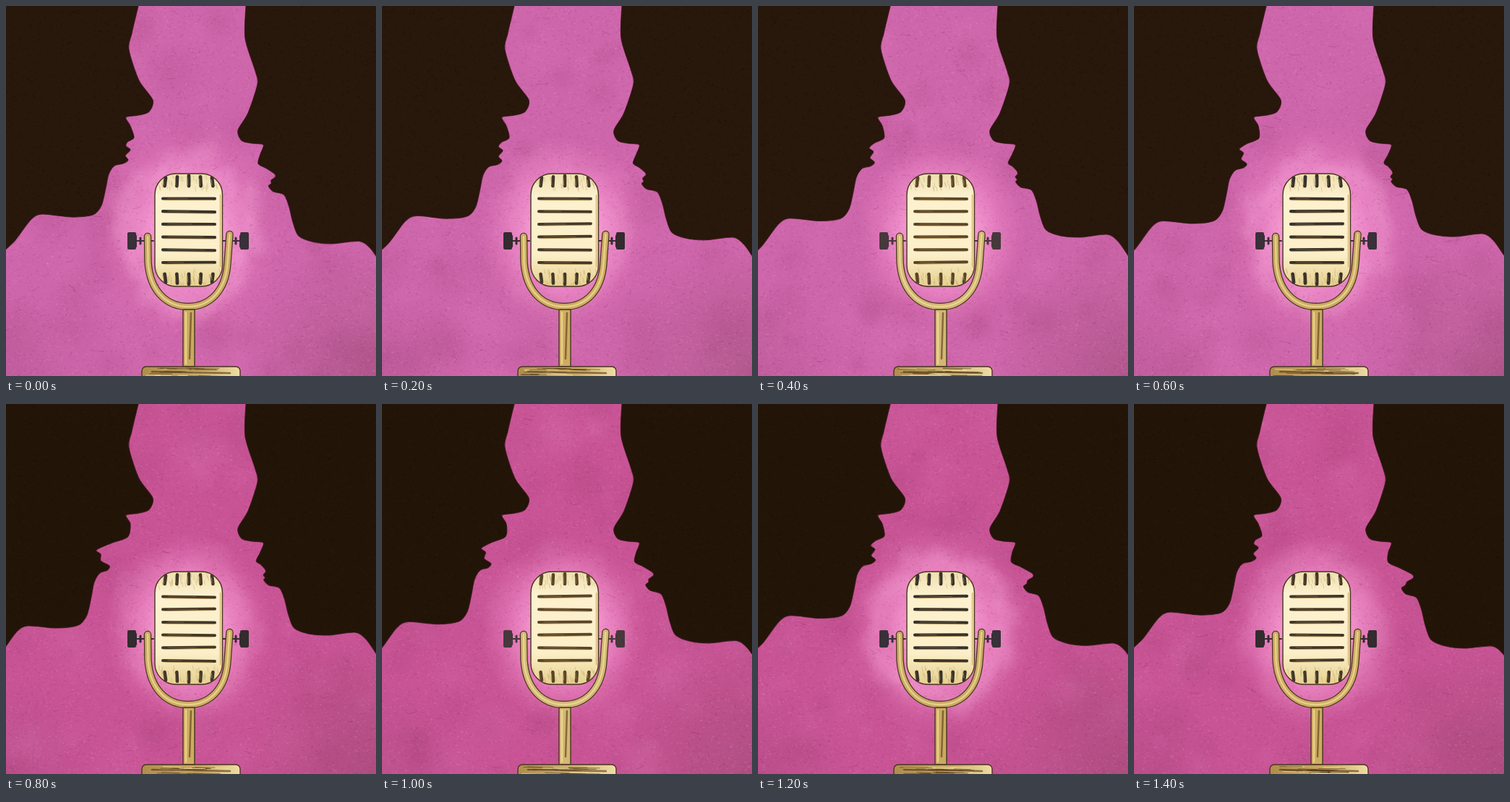
These frames come from a looping animation (512 px wide and 512 px high, 1600 ms). An HTML page with a canvas:

```html
<!DOCTYPE html>
<html lang="en">
<head>
<meta charset="utf-8">
<title>Two voices, one microphone</title>
<style>
html, body { margin: 0; width: 100%; height: 100%; overflow: hidden; background: #c966a8; }
canvas { display: block; width: 100vw; height: 100vh; }
</style>
</head>
<body>
<canvas id="stage" width="512" height="512"></canvas>
<script>
const SIZE = 512, STEP = 200, STEPS = 8;
const TAU = Math.PI * 2;

// A face at rest: still brow and nose, then lips, chin, neck and shoulder.
// Opening the mouth carries the jaw by "body" and the lips by "lip" more.
const left = {
  edge: 0, body: -20, lip: -22,
  open: [0, .12, .3, .5, 1, .7, .25, 0],
  brow: [183,0, 174,38, 170,60, 184,103, 203,130, 198,146, 184,151],
  jaw: [166,154, 172,166, 177,182, 168,188, 166,194, 172,199, 165,207, 169,213, 162,218, 150,221,
    142,233, 138,252, 132,276, 120,289, 90,292, 50,288, 34,296, 12,325, -10,345]
};
const right = {
  edge: SIZE, body: 13, lip: 16,
  open: [.52, .25, .05, 0, .05, .62, .8, 1],
  brow: [332,0, 331,45, 345,90, 348,108, 335,148, 321,172, 326,186, 340,190],
  jaw: [356,192, 352,205, 346,217, 352,222, 357,228, 358,232, 355,236, 358,240, 356,243, 363,250,
    378,254, 385,270, 390,290, 398,309, 418,317, 445,319, 482,315, 498,325, 514,348]
};

// Three hand-inked versions of the microphone and glow take turns
const looks = [
  { ink: '#39322b', bar: 4.2, knob: '#393039', gold: '#c9aa62', reach: 132, patchy: 1 },
  { ink: '#5a4528', bar: 4, knob: '#47383b', gold: '#d2b775', reach: 116, patchy: .2 },
  { ink: '#433728', bar: 4, knob: '#332b2e', gold: '#cdac62', reach: 118, patchy: .4 }
];

function random(seed) {
  let s = seed * 7919 + 17;
  return () => (s = (s * 16807) % 2147483647) / 2147483647;
}

const rgba = (c, a) => `rgba(${c.join()},${a})`;

function outline(side, step) {
  const k = side.open[step];
  const jaw = side.jaw.map((v, n) => {
    const i = n >> 1;
    const ramp = k * Math.max(0, Math.min(1, (i - 1) / 3));
    const pout = Math.exp(-(((i - 4.5) / 2.2) ** 2));
    return v + ramp * (n % 2 ? Math.min(22, 4 + i) : side.body + side.lip * pout);
  });
  return side.brow.concat(jaw);
}

function blob(g, x, y, r, color, a) {
  const f = g.createRadialGradient(x, y, 0, x, y, r);
  f.addColorStop(0, rgba(color, a));
  f.addColorStop(1, rgba(color, 0));
  g.fillStyle = f;
  g.fillRect(x - r, y - r, 2 * r, 2 * r);
}

function paper(g, pink, look, rnd) {
  g.fillStyle = rgba(pink, 1);
  g.fillRect(0, 0, SIZE, SIZE);
  for (let i = 0; i < 90; i++) {
    const tone = i % 2 ? [150, 55, 105] : [226, 128, 190];
    blob(g, rnd() * SIZE, rnd() * SIZE, 15 + rnd() * 35, tone, .13);
  }
  blob(g, SIZE, SIZE, 190, [135, 65, 95], .4);
  blob(g, 0, SIZE, 130, [135, 55, 100], .2);

  g.save();
  g.translate(253, 313);
  g.scale(1, 1.13);
  const f = g.createRadialGradient(0, 0, 45, 0, 0, look.reach);
  f.addColorStop(0, 'rgba(255,168,222,.8)');
  f.addColorStop(.4, 'rgba(248,146,208,.55)');
  f.addColorStop(.75, 'rgba(236,125,190,.2)');
  f.addColorStop(1, 'rgba(230,120,185,0)');
  g.fillStyle = f;
  g.fillRect(-160, -160, 320, 320);
  for (let i = 0; i < 34; i++) {
    const a = i / 34 * TAU, r = 75 + rnd() * 26;
    blob(g, Math.cos(a) * r, Math.sin(a) * r, 13 + rnd() * 12, [246, 168, 218], .26 * look.patchy);
  }
  g.restore();
}

function grain(g, rnd) {
  for (let i = 0; i < 12000; i++) {
    g.fillStyle = rnd() < .5 ? 'rgba(110,30,75,.1)' : 'rgba(255,190,230,.1)';
    g.fillRect(rnd() * SIZE, rnd() * SIZE, 1 + rnd() * 2, 1 + rnd());
  }
  g.lineWidth = .7;
  g.strokeStyle = 'rgba(105,25,70,.28)';
  for (let i = 0; i < 55; i++) {
    const x = rnd() * SIZE, y = rnd() * SIZE, a = rnd() * TAU, r = 2 + rnd() * 6;
    g.beginPath();
    g.moveTo(x, y);
    g.quadraticCurveTo(x + r, y + rnd() * 4, x + Math.cos(a) * r * 2, y + Math.sin(a) * r);
    g.stroke();
  }
}

function curve(g, p) {
  const n = p.length / 2, k = .14;
  const at = i => { i = Math.max(0, Math.min(n - 1, i)); return [p[2 * i], p[2 * i + 1]]; };
  g.moveTo(p[0], p[1]);
  for (let i = 0; i < n - 1; i++) {
    const [a, b, c, d] = [at(i - 1), at(i), at(i + 1), at(i + 2)];
    g.bezierCurveTo(b[0] + (c[0] - a[0]) * k, b[1] + (c[1] - a[1]) * k,
      c[0] - (d[0] - b[0]) * k, c[1] - (d[1] - b[1]) * k, c[0], c[1]);
  }
}

function face(g, side, step, dark, rnd) {
  const points = outline(side, step);
  g.save();
  g.beginPath();
  curve(g, points);
  g.lineTo(side.edge, SIZE * .6);
  g.lineTo(side.edge, 0);
  g.closePath();
  g.fillStyle = dark;
  g.fill();
  g.clip();
  for (let i = 0; i < 2200; i++) {
    g.fillStyle = i % 2 ? 'rgba(70,43,22,.16)' : 'rgba(5,2,0,.16)';
    g.fillRect(Math.abs(side.edge - rnd() * 212), rnd() * 362, 2, 1.5);
  }
  g.restore();
  g.beginPath();
  curve(g, points);
  g.strokeStyle = 'rgba(58,20,25,.8)';
  g.lineWidth = 1.2;
  g.stroke();
}

function box(g, x, y, w, h, r, fill, line) {
  g.beginPath();
  g.roundRect(x, y, w, h, r);
  g.fillStyle = fill;
  g.fill();
  if (line) {
    g.strokeStyle = line;
    g.lineWidth = 1.4;
    g.stroke();
  }
}

function dash(g, x1, y1, x2, y2, w, color) {
  g.beginPath();
  g.moveTo(x1, y1);
  g.lineTo(x2, y2);
  g.lineWidth = w;
  g.strokeStyle = color;
  g.stroke();
}

function yoke(g, w, color) {
  g.beginPath();
  g.moveTo(196, 319);
  g.lineTo(196.5, 354);
  g.bezierCurveTo(199, 394, 222, 416, 252, 416);
  g.bezierCurveTo(282, 416, 304, 394, 306.5, 356);
  g.lineTo(309.5, 316);
  g.lineWidth = w;
  g.strokeStyle = color;
  g.stroke();
}

function screw(g, x, out, color) {
  dash(g, x, 325, x + out * 24, 325, 1.8, color);
  dash(g, x + out * 18, 321, x + out * 18, 329, 3, color);
  box(g, x + out * 30 - 6, 313, 12, 24, 2, color);
  dash(g, x + out * 24, 318, x + out * 24, 333, 2, color);
}

function stand(g, look, edge, rnd) {
  const { gold } = look;
  yoke(g, 10.5, edge);
  yoke(g, 8, gold);
  yoke(g, 2.5, 'rgba(248,228,160,.65)');
  box(g, 245, 420, 16, 79, 1, gold, edge);
  dash(g, 249, 424, 249, 495, 2.5, 'rgba(246,224,155,.7)');
  dash(g, 256, 425, 254, 488, 2.5, 'rgba(95,65,25,.65)');
  const f = g.createLinearGradient(187, 0, 324, 0);
  f.addColorStop(0, '#ae8d4c');
  f.addColorStop(.6, gold);
  f.addColorStop(1, '#efdda6');
  box(g, 188, 499, 136, 22, 6, f, edge);
  for (let i = 0; i < 20; i++) {
    const x = 192 + rnd() * 80, y = 501 + rnd() * 11;
    dash(g, x, y, x + 20 + rnd() * 28, y + rnd(), 1, i % 3 ? 'rgba(75,50,20,.6)' : 'rgba(250,228,165,.7)');
  }
  dash(g, 202, 506, 310, 508, 2.5, 'rgba(75,48,20,.6)');
}

function head(g, look, edge, rnd) {
  const { ink, bar } = look, shade = 'rgba(190,150,75,.7)';
  const f = g.createLinearGradient(0, 232, 0, 388);
  f.addColorStop(0, '#eedfae');
  f.addColorStop(.2, '#fdf1cf');
  f.addColorStop(.72, '#fcefc8');
  f.addColorStop(1, '#e6d08f');
  box(g, 206, 232, 93.5, 156, 29, f, edge);
  g.save();
  g.clip();
  for (let i = 0; i < 70; i++) {
    const x = 208 + rnd() * 90, y = i % 2 ? 233 + rnd() * 18 : 362 + rnd() * 22;
    dash(g, x, y, x + 1, y + 6, .8, 'rgba(165,130,65,.38)');
  }
  dash(g, 297, 262, 297, 360, 3, 'rgba(205,172,100,.55)');
  for (let i = -2; i <= 2; i++) {
    const x = 253 + i * 16.7, lean = i * .7, drop = Math.abs(i) * 1.3;
    dash(g, x - lean, 235 + drop, x, 249, bar + .6, ink);
    dash(g, x, 371, x - lean, 385 - drop, bar + .6, ink);
    dash(g, x - 2, 238 + drop, x - 1.5, 248, 1, shade);
    dash(g, x - 2, 373, x - 1.5, 382 - drop, 1, shade);
  }
  for (let i = 0; i < 6; i++) {
    const y = 266.5 + i * 17.7, tilt = rnd() * 2 - 1;
    dash(g, 217, y, 289, y + tilt, bar, ink);
    dash(g, 220, y + 2.3, 286, y + 2 + tilt, 1, shade);
    dash(g, 224, y - .5, 240 + rnd() * 35, y, .8, 'rgba(165,135,85,.55)');
  }
  g.restore();
}

function render(step) {
  const c = document.createElement('canvas');
  c.width = c.height = SIZE;
  const g = c.getContext('2d');
  const look = looks[step * 2 % 3], rnd = random(step + 1), edge = '#49351f';
  const late = step >= STEPS / 2;
  g.lineJoin = g.lineCap = 'round';
  paper(g, late ? [200, 84, 149] : [206, 102, 171], look, rnd);
  grain(g, rnd);
  for (const side of [left, right]) face(g, side, step, late ? '#221508' : '#28170b', rnd);
  screw(g, 204, -1, look.knob);
  screw(g, 300, 1, look.knob);
  stand(g, look, edge, rnd);
  head(g, look, edge, rnd);
  return c;
}

const pages = Array.from({ length: STEPS }, (_, i) => render(i));
const ctx = document.getElementById('stage').getContext('2d');
const start = performance.now();

function draw(now) {
  const t = Math.max(0, now - start);
  ctx.drawImage(pages[Math.floor(t / STEP) % STEPS], 0, 0);
  requestAnimationFrame(draw);
}
draw(start);
</script>
</body>
</html>
```
